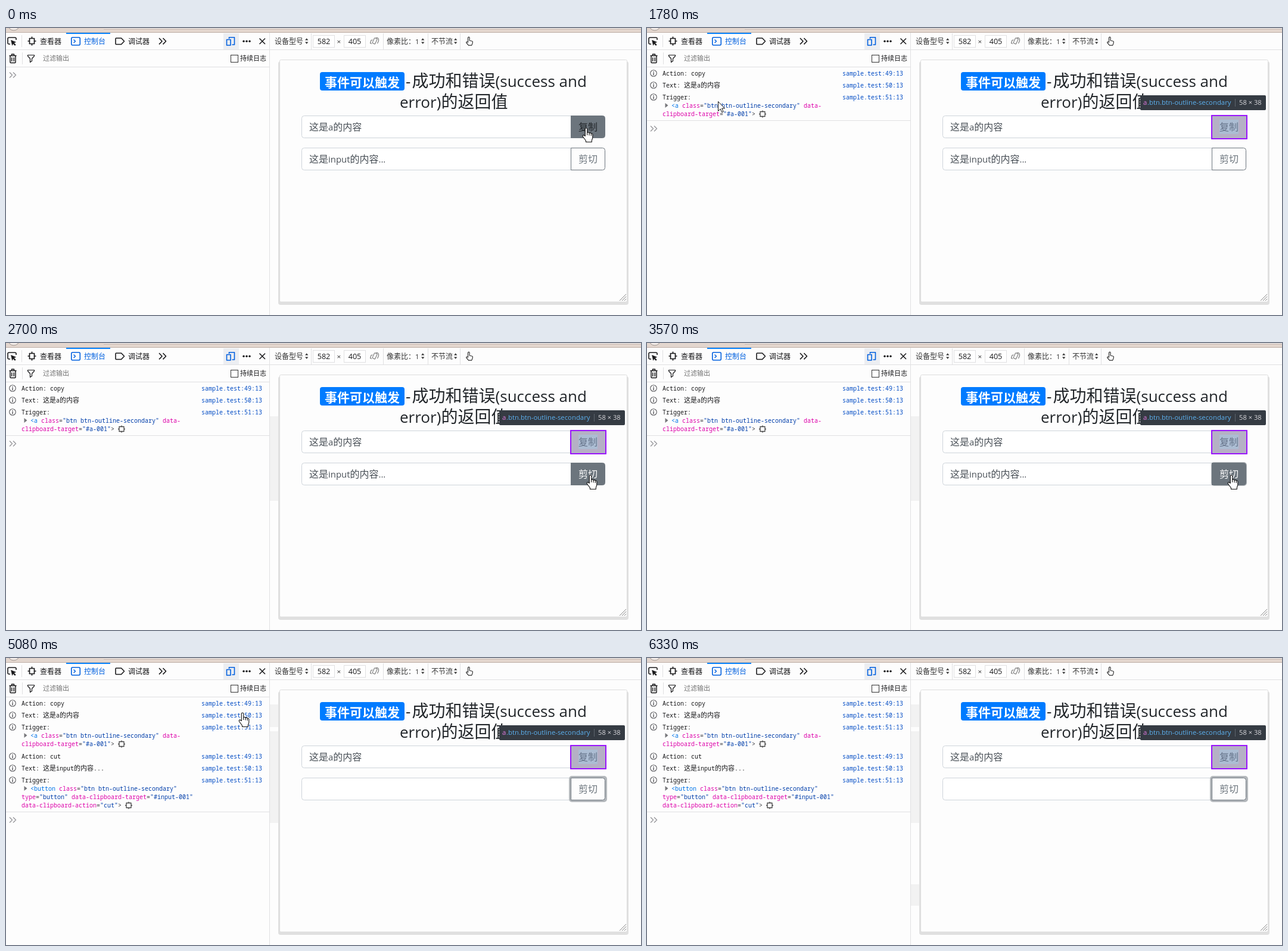
Animation, 1066 px wide and 482 px high, one loop 8000 ms. Source, as an HTML page:

```html
<!DOCTYPE html>
<html lang="zh">
<head>
<meta charset="utf-8">
<title>Clipboard events</title>
<style>
  html, body { margin: 0; width: 100%; height: 100%; overflow: hidden; background: #fdfdfd; }
  svg { display: block; width: 1066px; height: 482px; }
  text { white-space: pre; font-family: "Open Sans", "Noto Sans", sans-serif; }
  .mono { font-family: "Noto Sans Mono", "DejaVu Sans Mono", monospace; }
  .cjk { font-family: "Noto Sans CJK SC", "Noto Sans CJK", "Noto Sans CJK JP", sans-serif; }
</style>
</head>
<body>
<svg id="stage" viewBox="0 0 1066 482"></svg>
<script>
const LOOP = 8000;
const INK = '#18181a', GREY = '#6c757d', BLUE = '#0060df', LINK = '#004bc4', LINE = '#e0e0e2';
const HOST = 'sample.test';

// ---- markup helpers ----
const esc = s => s.replace(/&/g, '&amp;').replace(/</g, '&lt;');

// CJK runs keep the full size, Latin runs are scaled by k
const runs = (s, size, k) => s.split(/([^\x00-\xff]+)/).map((part, i) => !part ? '' : i % 2
  ? `<tspan class="cjk" font-size="${size}">${part}</tspan>`
  : `<tspan font-size="${size * k}">${esc(part)}</tspan>`).join('');

const text = (x, y, s, size, fill = INK, attrs = '') =>
  `<text x="${x}" y="${y}" fill="${fill}" ${attrs}>${runs(s, size, 0.93)}</text>`;

const mono = (x, y, s, fill = INK, attrs = '') =>
  `<text class="mono" x="${x}" y="${y}" fill="${fill}" ${attrs}>${runs(s, 11, 10 / 11)}</text>`;

const rect = (x, y, w, h, fill, attrs = '') =>
  `<rect x="${x}" y="${y}" width="${w}" height="${h}" fill="${fill}" ${attrs}/>`;

const path = (d, stroke = INK, width = 1.4, fill = 'none', attrs = '') =>
  `<path d="${d}" stroke="${stroke}" stroke-width="${width}" fill="${fill}" stroke-linejoin="round" ${attrs}/>`;

const group = (id, body) => `<g id="${id}">${body}</g>`;

const vline = (x, y, h) => rect(x, y, 1, h, LINE);

const spinner = x => path(`M${x} 20.5l2.7-3.2 2.7 3.2zM${x} 23.5l2.7 3.2 2.7-3.2z`, 'none', 0, '#333');

const nodeIcon = (x, y) => path(`M${x - 4} ${y - 4}h8v8h-8zM${x} ${y - 6}v2M${x} ${y + 4}v2M${x - 6} ${y}h2M${x + 4} ${y}h2`, '#444', 1.3);

const chevrons = (x, y) => path(`M${x} ${y - 4.5}l4.5 4.5-4.5 4.5M${x + 6} ${y - 4.5}l4.5 4.5-4.5 4.5`, '#949498', 1.3);

// ---- page parts ----
function chrome() {
  return rect(0, 0, 1066, 7, '#e3d6ce') + rect(0, 7, 1066, 1, '#bfb1a9') +
    '<circle cx="13" cy="-6" r="10" fill="#f3ece8" stroke="#a09690"/>' +
    rect(164, 0, 902, 1, '#fff') + rect(164, 1, 902, 1, '#b9aaa2');
}

function toolbar() {
  const tabs = rect(101, 8, 74, 2, '#0a84ff') +
    text(57, 26.5, '查看器', 12) + text(131, 26.5, '控制台', 12, BLUE) + text(205, 26.5, '调试器', 12);
  const icons =
    path('M7 27H5a2 2 0 0 1-2-2V18a2 2 0 0 1 2-2H15a2 2 0 0 1 2 2V20', INK, 1.6) +
    path('M8.5 20.5l8 3.2-3.2 1.2 3 3.2-1.4 1.3-3-3.2-1.4 3z', INK, 0.6, INK) +
    path('M39.5 17.5h8v9h-8zM43.5 14.5v3M43.5 26.5v3M36.5 22h3M47.5 22h3', INK, 1.7) +
    `<rect x="109.8" y="15.8" width="14.5" height="13" rx="2" fill="none" stroke="${BLUE}" stroke-width="1.6"/>` +
    path('M113.5 19.5l3 2.8-3 2.8', BLUE) +
    path('M185 17h8.5l5 5.3-5 5.2H185a1 1 0 0 1-1-1V18a1 1 0 0 1 1-1z', INK, 1.6) +
    path('M257 17l5 5.2-5 5.2M263.5 17l5 5.2-5 5.2', INK, 1.6) +
    rect(365, 9, 26, 27, '#eceef2') +
    path('M374.5 18v-2.3h9V28h-4', BLUE, 1.6) + path('M370.5 19.5h6.5v9.5h-6.5z', BLUE, 1.6) +
    [399, 404, 409].map(x => `<circle cx="${x}" cy="22.3" r="1.7" fill="${INK}"/>`).join('') +
    path('M425.5 17.5l9.5 9.5M435 17.5l-9.5 9.5', INK, 1.5);
  return rect(0, 36, 1066, 1, LINE) + vline(26, 12, 20) + tabs + icons;
}

function filterBar() {
  return path('M5.5 46.5h12M9.5 46v-2h4v2M7 47v10.5a1 1 0 0 0 1 1h7a1 1 0 0 0 1-1V47M9.7 49.5v6.5M13.3 49.5v6.5', INK, 1.5) +
    vline(27, 41, 20) +
    path('M36.5 45.5h11v1.5l-4 4.5v4l-3 2v-6l-4-4.5z', INK, 1.2) +
    text(62, 55, '过滤输出', 11, '#737373') +
    rect(377.5, 45.5, 12, 12, '#fff', 'stroke="#333"') +
    text(393, 55, '持续日志', 11) +
    rect(0, 65, 442, 1, LINE);
}

function deviceBar() {
  const field = (x, s) => rect(x + 0.5, 12.5, 36, 20, '#fff', `stroke="${LINE}"`) +
    text(x + 18.5, 27, s, 13.6, INK, 'text-anchor="middle"');
  const rotate = rect(616.5, 17, 5, 9.5, 'none', 'stroke="#777" stroke-width="1.1" rx="1" transform="rotate(25 619 22)"') +
    path('M614 26.5l-2.5-1 1.5-5 2.500-.5M621 16.500c3-1 5 1 4.500 5l-2 4.500', '#777', 1.1);
  return text(451, 26.5, '设备型号', 12, '#333') + spinner(502) + vline(512, 9, 27) +
    field(515, '582') + text(555.5, 26.5, '×', 12.5, '#333') + field(567, '405') + rotate +
    vline(633, 9, 27) + text(639, 26.5, '像素比：', 12, '#333') + text(687, 26.5, '1', 12.5, '#333') + spinner(697) +
    vline(708, 9, 27) + text(714, 26.5, '不节流', 12, '#333') + spinner(752) + vline(762, 9, 27) +
    path('M775.5 24v-7.5a1.3 1.3 0 0 1 2.6 0v4.5l4 1a1.5 1.5 0 0 1 1.3 1.7l-.6 3-1.3 2.5h-5l-3.5-4.2a1.1 1.1 0 0 1 1.5-1.6z', '#333', 1.2);
}

function card() {
  const field = y => path(`M949 ${y}.5H500.5a4 4 0 0 0-4 4v29a4 4 0 0 0 4 4H949`, '#ced4da', 1, '#fff');
  return rect(457, 56, 588, 409, '#e0e0e0', 'rx="4"') +
    rect(459.5, 53.5, 583, 406.5, '#fdfdfd', 'rx="2" stroke="#dedede"') +
    rect(527, 74, 142, 31, '#007bff', 'rx="4"') +
    text(535, 99, '事件可以触发', 21, '#fff', 'font-weight="700"') +
    text(671, 98.5, '-', 28, '#212529') + text(681.5, 98.5, '成功和错误(success and', 28, '#212529') +
    text(661, 133.5, 'error)的返回值', 28, '#212529') +
    field(147) + field(201) +
    text(509, 172, '这是a的内容', 16, '#495057') +
    group('inputText', text(509, 226, '这是input的内容...', 16, '#495057')) +
    path('M1030 458l11-11M1034 458l7-7M1038 458l3-3', '#888', 1);
}

const button = (id, y, label) =>
  path(`M948.5 ${y}.5h53a4 4 0 0 1 4 4v29a4 4 0 0 1-4 4h-53z`, GREY, 1, '#fdfdfd', `id="${id}Face"`) +
  text(961, y + 25, label, 16, GREY, `id="${id}Label"`);

function highlight() {
  return rect(948, 147, 59, 39, '#b5b0c5', 'stroke="#9400ff" stroke-width="1.8"') +
    rect(961, 154, 32, 24, '#acbdd3') + text(961, 172, '复制', 16, '#66748a') +
    rect(828, 113, 211, 25, '#353b43', 'rx="2"') +
    text(833, 129, 'a', 12.2, '#e07be0') +
    text(840, 129, '.btn.btn-outline-secondary', 12.2, '#5cb0ee') +
    rect(987, 119, 1, 13, '#5d646c') + text(994, 129, '58 × 38', 12, '#d7d7db');
}

// ---- console ----
function code(x, y, s) {
  const tint = { '<': '#0074e8', '"': '#003eaa' };
  const body = s.split(/(<\w+|"[^"]*"|[\w-]+(?==)|data-$)/).map((part, i) =>
    `<tspan fill="${i % 2 ? tint[part[0]] || '#dd00a9' : '#38383d'}">${esc(part)}</tspan>`).join('');
  return `<text class="mono" font-size="10" x="${x}" y="${y}">${body}</text>`;
}

function entry(top, action, value, lines) {
  const rows = ['Action: ' + action, 'Text: ' + value, 'Trigger:'].map((s, i) => {
    const y = top + i * 20;
    return `<circle cx="11" cy="${y}" r="5.3" fill="none" stroke="#58585c" stroke-width="1.1"/>` +
      rect(10.3, y - 3, 1.5, 1.5, '#58585c') + rect(10.3, y - 0.7, 1.5, 4, '#58585c') +
      mono(26, y + 4, s) + mono(328, y + 4, `${HOST}:${49 + i}:13`, LINK);
  }).join('');
  const tree = top + 54;
  const last = lines.length - 1;
  return rows + path(`M30.5 ${tree - 4}l5 4-5 4z`, 'none', 0, '#77777b') +
    lines.map((s, i) => code(i ? 26 : 41, tree + 4 + i * 14, s)).join('') +
    nodeIcon(38 + lines[last].length * 6, tree + last * 14 + 0.5);
}

const rule = y => rect(0, y, 442, 1, LINE);

// shaded stretches of the gutter beside the card: [ms, top, bottom]
const gutter = [[1920, 123, 265], [3970, 155, 277], [5080, 78, 116], [6210, 380, 416]];

document.getElementById('stage').innerHTML =
  rect(0, 0, 1066, 482, '#fdfdfd') + chrome() + toolbar() + filterBar() + deviceBar() +
  gutter.map(([, top, bottom], i) => rect(443, top, 14, bottom - top, '#f2f2f2', `id="gutter${i}"`)).join('') +
  rect(442, 8, 1, 474, LINE) + card() + button('copy', 147, '复制') +
  rect(948, 201, 58, 38, '#b4b8bc', 'id="cutRing" rx="5"') + button('cut', 201, '剪切') +
  group('log1', entry(76, 'copy', '这是a的内容',
    ['<a class="btn btn-outline-secondary" data-', 'clipboard-target="#a-001">'])) +
  group('log2', entry(165, 'cut', '这是input的内容...',
    ['<button class="btn btn-outline-secondary"', 'type="button" data-clipboard-target="#input-001"', 'data-clipboard-action="cut">'])) +
  group('prompt0', chevrons(6, 79)) +
  group('prompt1', rule(155) + chevrons(6, 169)) +
  group('prompt2', rule(258) + chevrons(6, 272)) +
  rect(328, 121, 102, 1, LINK, 'id="underline"') +
  group('highlight', highlight()) +
  group('hand', path('M-1.7 13.5V1.7a1.7 1.7 0 0 1 3.4 0V8c.6-1.2 3.2-.9 3.4.6.8-.9 2.8-.6 3.2.8 1-.6 2.5 0 2.5 1.6V16c0 2-1.5 3.5-1.5 5.5V23.5H-.5V21.5C-1.5 19.5-4 17-5.5 14.5-6.5 12.8-5 11.2-3.5 12.2zM1.7 8v4M5.1 9v3.5M8.3 10v3', '#111', 1.1, '#fff')) +
  group('arrow', path('M.5.5V16.5L4.2 13 6.8 18.6 9.2 17.5 6.7 12H11.5z', '#111', 1, '#fff'));

// ---- timeline: [ms, ...values], each held until the next ----
const pointer = [
  [0, 'hand', 974, 168], [1510, 'hand', 976, 173], [1660, 'arrow', 560, 150],
  [1780, 'arrow', 119, 123], [1920, 'arrow', 435, 180], [2040, 'arrow', 620, 225],
  [2160, 'arrow', 798, 246], [2280, 'arrow', 962, 263], [2430, 'hand', 975, 237],
  [2550, 'hand', 979, 230], [2700, 'hand', 981, 222], [4520, 'hand', 956, 219],
  [4640, 'arrow', 750, 150], [4760, 'arrow', 529, 86], [4920, 'arrow', 458, 78],
  [5080, 'hand', 397, 92], [5220, 'hand', 404, 123], [5370, 'arrow', 462, 200],
  [5490, 'arrow', 528, 278], [5650, 'arrow', 589, 325], [5800, 'arrow', 580, 358],
  [5940, 'arrow', 531, 380], [6090, 'arrow', 485, 388], [6210, 'arrow', 428, 397],
  [6330, 'none', 0, 0]
];
const copyStyle = [
  [0, GREY, '#212529'], [840, GREY, '#909294'], [960, GREY, '#fff'],
  [1230, GREY, '#212529'], [1660, '#fdfdfd', GREY]
];
const cutStyle = [
  [0, '#fdfdfd', GREY], [2550, '#b4b9bd', '#f0f1f2'], [2700, GREY, '#fff'],
  [4640, '#b4b9bd', '#f0f1f2'], [4760, '#fdfdfd', GREY]
];
const cutRing = [[0, 0], [3570, 1], [3690, 3]];

const $ = id => document.getElementById(id);
const at = (table, t) => table.findLast(step => step[0] <= t).slice(1);
const show = (id, on) => $(id).setAttribute('visibility', on ? 'visible' : 'hidden');

function paint(id, [face, label]) {
  $(id + 'Face').setAttribute('fill', face);
  $(id + 'Label').setAttribute('fill', label);
}

function setRing(spread) {
  const box = { x: 948 - spread, y: 201 - spread, width: 58 + 2 * spread, height: 38 + 2 * spread };
  for (const key in box) $('cutRing').setAttribute(key, box[key]);
}

function draw(t) {
  const [kind, x, y] = at(pointer, t);
  for (const id of ['hand', 'arrow']) {
    show(id, id === kind);
    $(id).setAttribute('transform', `translate(${x} ${y})`);
  }
  paint('copy', at(copyStyle, t));
  paint('cut', at(cutStyle, t));
  setRing(at(cutRing, t)[0]);
  gutter.forEach(([from], i) => show('gutter' + i, t >= from));
  show('cutRing', t >= 3570);
  show('log1', t >= 1230);
  show('log2', t >= 3970);
  show('prompt0', t < 1230);
  show('prompt1', t >= 1230 && t < 3970);
  show('prompt2', t >= 3970);
  show('inputText', t < 3970);
  show('highlight', t >= 1780);
  show('underline', t >= 5220 && t < 5370);
}

const start = performance.now();
function tick() {
  draw((performance.now() - start) % LOOP);
  requestAnimationFrame(tick);
}
tick();
</script>
</body>
</html>
```
